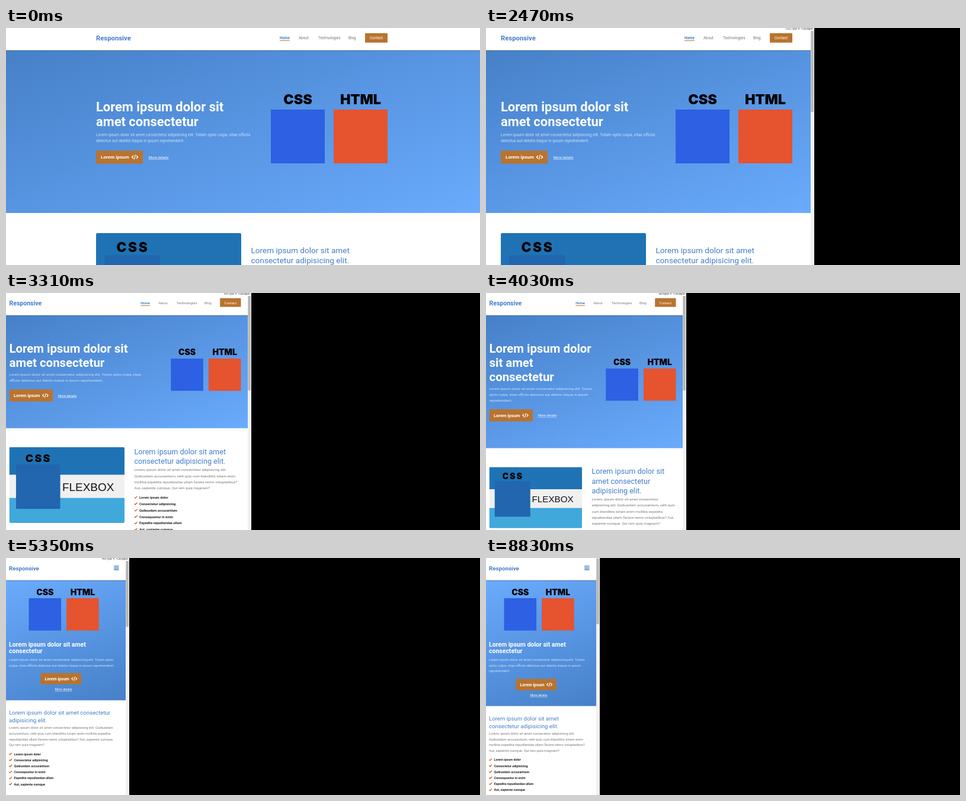
Write an HTML page with a canvas that moves like this. It is 800 px wide and 401 px high and loops after 9.08 s.

```html
<!DOCTYPE html>
<html lang="en">
<head>
<meta charset="utf-8">
<title>Responsive layout</title>
<style>
  html, body { margin: 0; width: 100%; height: 100%; overflow: hidden; background: #000; }
  canvas { display: block; width: 800px; height: 401px; }
</style>
</head>
<body>
<canvas id="stage" width="800" height="401"></canvas>
<script>
const W = 800, H = 401, LOOP = 9080;
const ctx = document.getElementById('stage').getContext('2d');
const SANS = 'Roboto, "Open Sans", sans-serif';
const BLUE = '#437ecb', ORANGE = '#b9732f', GREY = '#777';
const BODY_SIZE = 6.73;

const TITLE = 'Lorem ipsum dolor sit amet consectetur';
const INTRO = 'Lorem ipsum dolor sit amet consectetur adipisicing elit. Totam optio culpa, ' +
  'vitae officiis delectus aut debitis itaque in ipsum reprehenderit.';
const HEADING = 'Lorem ipsum dolor sit amet consectetur adipisicing elit.';
const BODY = 'Lorem, ipsum dolor sit amet consectetur adipisicing elit. Quibusdam accusantium, ' +
  'velit quis cum blanditiis totam enim mollitia expedita repudiandae ullam facere nemo ' +
  'voluptatibus? Aut, sapiente cumque. Qui rem quia magnam?';
const ITEMS = ['Lorem ipsum dolor', 'Consectetur adipisicing', 'Quibusdam accusantium',
  'Consequuntur in enim', 'Expedita repudiandae ullam', 'Aut, sapiente cumque'];

// Timing: full window, docked window, drag in 120 ms steps, menu.
const DOCK = 870, DRAG = 1870, STEP = 120, LAST = 31, MENU = 6460, CLOSE = 8830;
// Drag step and window width.
const DRAG_KEYS = [[0, 668], [5, 554], [7, 510], [12, 414], [15, 381], [23, 265], [24, 249], [31, 192]];

function windowWidth(t) {
  if (t < DOCK) return 808;
  if (t < DRAG) return 672;
  const n = Math.min(LAST, Math.floor((t - DRAG) / STEP));
  const i = Math.max(1, DRAG_KEYS.findIndex(([k]) => k >= n));
  const [k0, w0] = DRAG_KEYS[i - 1], [k1, w1] = DRAG_KEYS[i];
  return Math.round(w0 + (w1 - w0) * (n - k0) / (k1 - k0));
}

function rect(x, y, w, h, color, r = 0) {
  ctx.fillStyle = color;
  ctx.beginPath();
  ctx.roundRect(x, y, w, h, r);
  ctx.fill();
}

function text(str, x, y, size, color, weight = 400, align = 'left', family = SANS) {
  ctx.font = `${weight} ${size}px ${family}`;
  ctx.fillStyle = color;
  ctx.textAlign = align;
  ctx.fillText(str, x, y);
  return ctx.measureText(str).width;
}

function stroke(points, color, width) {
  ctx.strokeStyle = color;
  ctx.lineWidth = width;
  ctx.beginPath();
  points.forEach(([x, y]) => ctx.lineTo(x, y));
  ctx.stroke();
}

function wrap(str, size, weight, max) {
  ctx.font = `${weight} ${size}px ${SANS}`;
  const lines = [];
  let line = '';
  for (const word of str.split(' ')) {
    const next = line ? line + ' ' + word : word;
    if (line && ctx.measureText(next).width > max) {
      lines.push(line);
      line = word;
    } else line = next;
  }
  return [...lines, line];
}

// Draws lines from baseline y and returns the last baseline.
function paragraph(lines, x, y, gap, size, color, weight) {
  lines.forEach((line, i) => text(line, x, y + i * gap, size, color, weight));
  return y + (lines.length - 1) * gap;
}

function layout(w) {
  const mode = w > 414 ? 'desktop' : w > 320 ? 'tablet' : 'mobile';
  const k = { desktop: 1, tablet: 0.93, mobile: 0.865 }[mode];
  const cw = Math.min(492, w - 23);
  const x = mode === 'mobile' ? 5 : w / 2 - 6 - cw / 2;
  return { w, mode, k, cw, x, right: x + cw, page: w - 6, mobile: mode === 'mobile' };
}

function hamburger(w, color) {
  for (let i = 0; i < 3; i++) rect(w - 26, 13 + i * 2.9, 8.6, 1.6, color, 0.6);
}

function header({ w, k, x, right, page, mobile }) {
  rect(0, 0, page, 38, '#fff');
  const shade = ctx.createLinearGradient(0, 37, 0, 40);
  shade.addColorStop(0, 'rgba(30,50,90,.35)');
  shade.addColorStop(1, 'rgba(30,50,90,0)');
  rect(0, 37, page, 3, shade);
  text('Responsive', x, 21, 11.3 * k, BLUE, 700);
  if (mobile) return hamburger(w, BLUE);
  const size = 6.3 * k, y = 19;
  const home = text('Home', right - 182 * k, y, size, BLUE, 700);
  rect(right - 182 * k, 20.8, home, 1, ORANGE);
  text('About', right - 150 * k, y, size, GREY);
  text('Technologies', right - 117 * k, y, size, GREY);
  text('Blog', right - 66 * k, y, size, GREY);
  rect(right - 38 * k, 8.7, 38 * k, 16 * k, ORANGE, 1.2);
  text('Contact', right - 19 * k, y, size, '#fff', 400, 'center');
}

function heroBack(width, height, flip) {
  const a = 20 * Math.PI / 180, cx = width / 2, cy = 38 + height / 2;
  const half = (width * Math.sin(a) + height * Math.cos(a)) / 2;
  const dx = Math.sin(a) * half, dy = Math.cos(a) * half;
  const g = ctx.createLinearGradient(cx - dx, cy - dy, cx + dx, cy + dy);
  g.addColorStop(flip ? 1 : 0, '#4680c8');
  g.addColorStop(flip ? 0 : 1, '#6aabfd');
  rect(0, 38, width, height, g);
}

// Two captioned squares; x and y are the top left corner.
function badges(x, y, s) {
  const badge = (name, bx, color) => {
    text(name, bx + 45.5 * s, y + 17 * s, 23.4 * s, '#000', 900, 'center', 'Inter, sans-serif');
    rect(bx, y + 26 * s, 91 * s, 91 * s, color);
  };
  badge('CSS', x, '#2d60e3');
  badge('HTML', x + 106 * s, '#e5532f');
}

function button(x, y, k) {
  rect(x, y, 79 * k, 22 * k, ORANGE, 1.2);
  const base = y + 14 * k;
  text('Lorem ipsum', x + 8 * k, base, 8.1 * k, '#fff', 700);
  const ix = x + 60 * k, iy = y + 11 * k, at = pts => pts.map(([px, py]) => [ix + px * k, iy + py * k]);
  stroke(at([[3, -2.6], [0.5, 0], [3, 2.6]]), '#fff', 1.4 * k);
  stroke(at([[8, -2.6], [10.5, 0], [8, 2.6]]), '#fff', 1.4 * k);
  stroke(at([[6.6, -4], [4.4, 4]]), '#fff', 1.2 * k);
}

function moreLink(x, y, k, align = 'left') {
  const w = text('More details', x, y, 6.1 * k, '#fff', 400, align);
  rect(align === 'center' ? x - w / 2 : x, y + 0.9, w, 0.6, 'rgba(255,255,255,.8)');
}

// Returns the bottom edge of the hero.
function hero(l) {
  const { w, mode, k, cw, x, right, page, mobile } = l;
  const titleSize = mobile ? 10.5 : 21.9 * k, introSize = BODY_SIZE * k;
  const max = mobile ? w - 22 : cw * 0.58;
  const title = wrap(TITLE, titleSize, 700, mobile ? max : Math.min(max, 240 * k));
  const intro = wrap(INTRO, introSize, 400, max);
  const light = 'rgba(255,255,255,.72)';

  if (mobile) {
    const narrow = w < 248;
    const introTop = 149.5 + (title.length - 1) * 11.8 + 12.5;
    const btnTop = introTop + (intro.length - 1) * 9.8 + 11.2;
    const bottom = btnTop + (narrow ? 46 : 34);
    heroBack(page, bottom - 38, true);
    badges(w / 2 - 65.5, 52.5, 0.6);
    paragraph(title, x, 149.5, 11.8, titleSize, '#fff', 700);
    paragraph(intro, x, introTop, 9.8, introSize, light, 400);
    button(narrow ? w / 2 - 45.5 : x, btnTop, k);
    if (narrow) moreLink(w / 2 - 7, btnTop + 29.3, k, 'center');
    else moreLink(x + 88 * k, btnTop + 12.3, k);
    return bottom;
  }

  const s = mode === 'desktop' ? 1 : 0.6;
  const block = (70 + (title.length - 1) * 25.5 + (intro.length - 1) * 10.7) * k;
  const height = s === 1 ? Math.max(275, block + 148) : Math.max(190, block + 92);
  const mid = 38 + height / 2;
  heroBack(page, height, false);
  badges(right - 197 * s, mid - 63.5 * s, s);
  let y = mid - block / 2 + 0.8 + 17.5 * k;
  y = paragraph(title, x, y, 25.5 * k, titleSize, '#fff', 700);
  y = paragraph(intro, x, y + 16.5 * k, 10.7 * k, introSize, light, 400) + 14 * k;
  button(x, y, k);
  moreLink(x + 88.7 * k, y + 13.5 * k, k);
  return 38 + height;
}

function card(x, y, width) {
  const s = width / 195.5;
  ctx.save();
  ctx.translate(x, y);
  ctx.scale(s, s);
  ctx.beginPath();
  ctx.roundRect(0, 0, 195.5, 129, 2);
  ctx.clip();
  rect(0, 0, 196, 48, '#1f73b5');
  rect(0, 47, 196, 40, '#f0f0f0');
  rect(0, 86.5, 196, 43, '#41a8dc');
  rect(11.5, 30, 75, 75, '#2166ae');
  ctx.letterSpacing = '2.2px';
  text('CSS', 27.5, 25.7, 18, '#000', 900, 'left', 'Inter, sans-serif');
  ctx.letterSpacing = '0px';
  text('FLEXBOX', 90, 75, 19, '#111', 400, 'left', '"Liberation Sans", Arial, sans-serif');
  ctx.restore();
}

function list(x, y, gap, k) {
  ITEMS.forEach((item, i) => {
    const by = y + i * gap;
    stroke([[x + 0.4, by - 2.3], [x + 1.9, by - 0.8], [x + 5, by - 4]], '#c0602a', 1.3);
    text(item, x + 8.5, by, 6.2 * k, '#222', 700);
  });
  return y + (ITEMS.length - 1) * gap;
}

function section(l, top) {
  const { w, mode, k, cw, x, page, mobile } = l;
  const size = mobile ? 9.65 : 13.6 * k, bodySize = BODY_SIZE * k;
  const tx = mobile ? x : x + cw / 2 + 15.5;
  const max = mobile ? w - 22 : cw / 2 - 15.5;
  const lead = mobile ? 12.4 : 17.4 * k, line = mobile ? 9.8 : 11 * k;
  let y = top + (mobile ? 24.5 : mode === 'tablet' ? 44 : 68);
  if (!mobile) card(x, top + (mode === 'tablet' ? 32 : 34), cw / 2 - 1);
  y = paragraph(wrap(HEADING, size, 400, max), tx, y, lead, size, BLUE, 400);
  y = paragraph(wrap(BODY, bodySize, 400, max), tx, y + (mobile ? 11.3 : 13.4 * k), line, bodySize, GREY, 400);
  y = list(tx, y + (mobile ? 15.2 : 17 * k), mobile ? 10.2 : 11.7 * k, k);
  if (!mobile) return;
  rect(0, y + 18, page, H, '#eee');
  text('Lorem ipsum dolor sit', w / 2 - 6.5, y + 44, 9.5, '#666', 400, 'center');
}

function menu(w, alpha) {
  rect(0, 0, w - 6, H, `rgba(255,255,255,${0.88 * alpha})`);
  ctx.globalAlpha = alpha;
  hamburger(w, '#7d6f78');
  const cx = w / 2 - 6.7, size = 8.1;
  const home = text('Home', cx, 167.5, 8.5, '#555', 700, 'center');
  rect(cx - home / 2, 170.8, home, 1.2, ORANGE);
  ['About', 'Technologies', 'Blog'].forEach((name, i) =>
    text(name, cx, 188 + i * 20.6, size, '#555', 400, 'center'));
  rect(cx - 24, 239.5, 48, 20, ORANGE, 1.5);
  text('Contact', cx, 252.8, size, '#fff', 400, 'center');
  ctx.globalAlpha = 1;
}

function scrollbar({ w, mode }, dragging) {
  rect(w - 6, 0, 6, H, '#f1f1f1');
  const end = mode === 'desktop' ? 142 : mode === 'tablet' ? 165 : 112 + (w - 192) * 0.28;
  const top = dragging ? 5 : 1;
  rect(w - 5.7, top, 4.6, end - top, '#b9b9b9');
  if (!dragging) return;
  rect(w - 48, 0, 48, 5, '#fff');
  const px = Math.round((w - 1.1) / 0.41667);
  text(`${px}px × 1008px`, w - 2.5, 3.2, 6.2, '#444', 400, 'right');
}

function draw(t) {
  const l = layout(windowWidth(t));
  ctx.fillStyle = '#000';
  ctx.fillRect(0, 0, W, H);
  ctx.save();
  ctx.beginPath();
  ctx.rect(0, 0, l.w, H);
  ctx.clip();
  rect(0, 0, l.w, H, '#fff');
  const bottom = hero(l);
  section(l, bottom);
  header(l);
  if (t >= MENU && t < CLOSE) menu(l.w, t < MENU + STEP ? 0.5 : 1);
  scrollbar(l, t >= DRAG && t < MENU);
  ctx.restore();
}

const start = performance.now();
function tick() {
  draw((performance.now() - start) % LOOP);
  requestAnimationFrame(tick);
}
tick();
</script>
</body>
</html>
```
